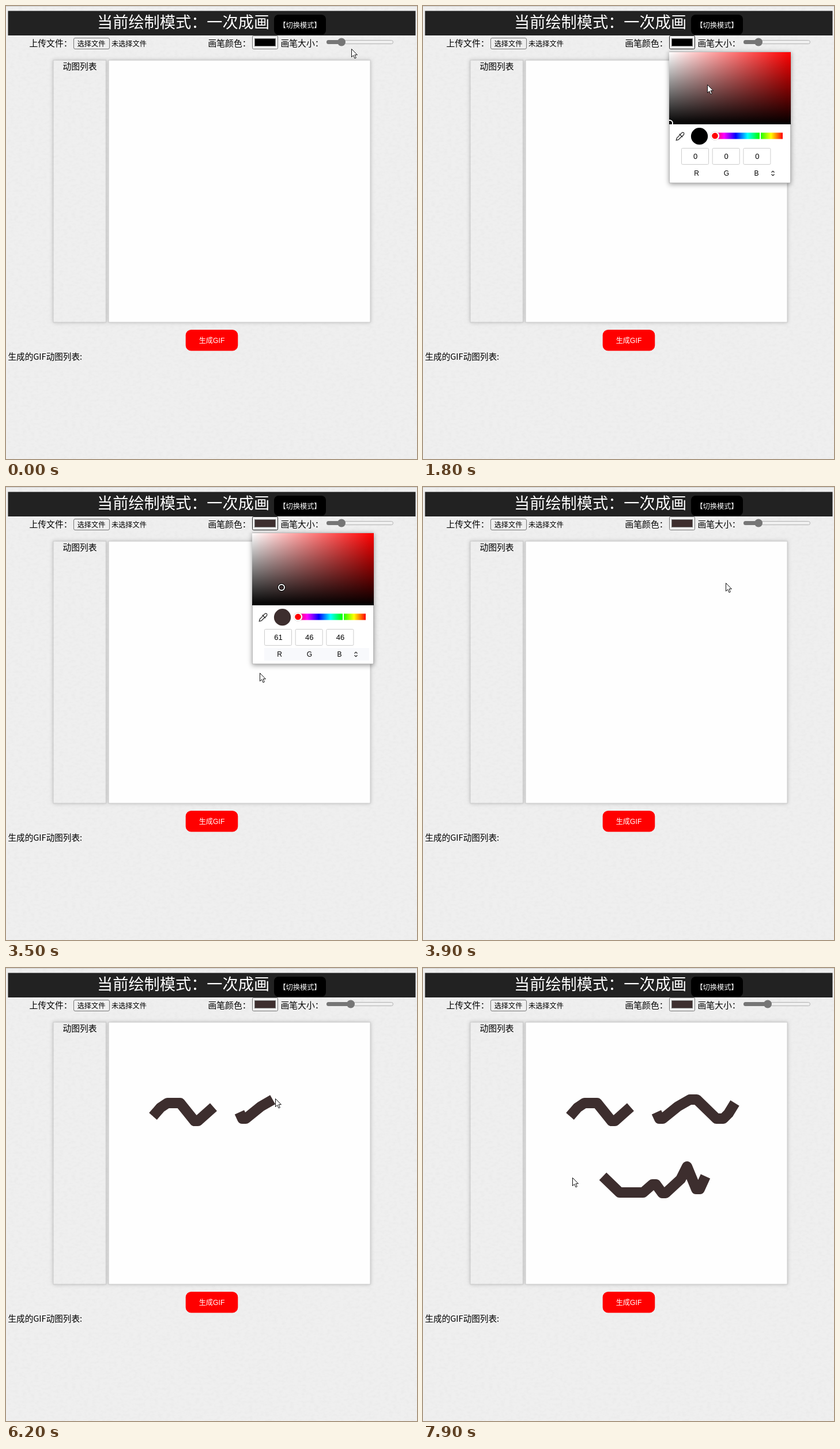
Recreate the animation shown at these times as an HTML page. Size 713 by 785 pixels, loop 8000 ms.

```html
<!DOCTYPE html>
<html lang="zh-CN">
<head>
<meta charset="utf-8">
<style>
html, body { margin: 0; width: 100%; height: 100%; overflow: hidden; background: #efefef }
svg { display: block; position: absolute; left: 0; top: 0 }
text { font: 14.8px "Noto Sans CJK SC", "Noto Sans CJK", "Noto Sans", sans-serif }
text.s { font-size: 12.2px }
text.n { font: 13px "Liberation Sans", Arial, sans-serif; text-anchor: middle }
.mid { text-anchor: middle }
.panel { filter: drop-shadow(0 0 3px #bbb); stroke: #ccc }
.popup { filter: drop-shadow(0 2px 4px #0006); fill: #fff; stroke: #bbb }
.box { fill: #fff; stroke: #ccc }
#ink { fill: none; stroke: #3d2e2e; stroke-width: 18; stroke-linejoin: round }
</style>
</head>
<body>
<svg width="713" height="785" viewBox="0 0 713 785">
  <defs>
    <filter id="paper" x="0" y="0" width="1" height="1" color-interpolation-filters="sRGB">
      <feTurbulence type="fractalNoise" baseFrequency=".14 .22" numOctaves="2" seed="4"/>
      <feColorMatrix values="0 0 0 0 0  0 0 0 0 0  0 0 0 0 0  .04 0 0 0 -.016"/>
    </filter>
    <linearGradient id="sat"><stop stop-color="#fff"/><stop offset="1" stop-color="#f00"/></linearGradient>
    <linearGradient id="val" x2="0" y2="1"><stop stop-opacity="0"/><stop offset="1"/></linearGradient>
    <linearGradient id="hue"></linearGradient>
    <clipPath id="area"><path d="M427 80H638V205H427Z"/></clipPath>
  </defs>

  <rect width="713" height="785" fill="#efefef"/>
  <rect class="panel" x="82" y="94" width="91.5" height="454" fill="#efefef"/>
  <rect x="3" width="710" height="785" filter="url(#paper)"/>
  <path d="M0 .5H713" stroke="#ccc"/>
  <rect class="panel" x="178" y="94" width="454" height="454" fill="#fefefe"/>

  <rect x="3.5" y="8.5" width="707" height="42.5" fill="#222"/>
  <text x="158" y="38.3" fill="#fff" style="font-size:27.2px">当前绘制模式：一次成画</text>
  <rect x="465" y="15" width="90" height="35" rx="8"/>
  <text class="s mid" x="510" y="37.5" fill="#fff">【切换模式】</text>

  <text x="40.5" y="70">上传文件：</text>
  <rect x="117.5" y="55.5" width="62" height="19" rx="2.5" fill="#efefef" stroke="#767676"/>
  <text class="s mid" x="148" y="69.7">选择文件</text>
  <text class="s" x="183" y="69.7">未选择文件</text>
  <text x="350.5" y="70">画笔颜色：</text>
  <rect id="well" x="427.5" y="51.5" width="44" height="23" rx="2" fill="#efefef"/>
  <rect class="tint" x="431.5" y="56.5" width="36" height="13" stroke="#777"/>
  <text x="476.5" y="70">画笔大小：</text>
  <rect x="556.5" y="59.5" width="115" height="6" rx="3" fill="#efefef" stroke="#b2b2b2"/>
  <rect id="fill" x="556" y="59" height="7" rx="3.5" fill="#767676"/>
  <circle id="knob" cy="62.5" r="7" fill="#767676"/>

  <text class="mid" x="128" y="110">动图列表</text>
  <rect x="311.7" y="561" width="90.6" height="36.5" rx="9.5" fill="#f00"/>
  <text class="s mid" x="357" y="584" fill="#fff" style="font-family:'Liberation Sans','Noto Sans CJK SC',sans-serif">生成GIF</text>
  <text x="3.5" y="613" style="font-size:14.6px">生成的GIF动图列表:</text>

  <g id="ink"></g>

  <g id="picker">
    <rect class="popup" x="427.5" y="79.5" width="210" height="227"/>
    <rect x="427" y="80" width="211" height="125" fill="url(#sat)"/>
    <rect x="427" y="80" width="211" height="125" fill="url(#val)"/>
    <g clip-path="url(#area)"><g id="ring">
      <circle class="tint" r="5" stroke="#000" stroke-width="4"/>
      <circle r="5" fill="none" stroke="#fff" stroke-width="2"/>
    </g></g>
    <path transform="translate(446 226) rotate(45)" fill="none" stroke="#222" stroke-width="1.2"
      d="M-2 -2V6L0 9.5L2 6V-2M-4 -2H4M-2.3 -2V-7Q0 -11 2.3 -7V-2"/>
    <circle class="tint" cx="479.5" cy="225.7" r="14.6"/>
    <rect x="502" y="219.5" width="122" height="11" fill="url(#hue)"/>
    <path d="M585 219V231" stroke="#fff" stroke-width="2"/>
    <circle cx="506.5" cy="225" r="7.8" fill="#ccc"/>
    <circle cx="506.5" cy="225" r="6.3" fill="#f00" stroke="#fff" stroke-width="2"/>
    <rect id="hover" x="448" y="279" width="182" height="22" fill="#f8f9fc"/>
    <g id="fields"></g>
    <path d="M604.5 288.5L607 286L609.5 288.5M604.5 291.5L607 294L609.5 291.5" fill="none" stroke="#222" stroke-width="1.2"/>
  </g>

  <path id="cursor" d="M.5 .5V14.5L3.7 11.5L6 16.8L8.3 15.8L6 10.7H10.4Z" fill="#fff" stroke="#111"/>
</svg>
<script>
const $ = id => document.getElementById(id);
const all = q => [...document.querySelectorAll(q)];
const progress = (t, a, b) => Math.min(1, Math.max(0, (t - a) / (b - a)));

$('hue').innerHTML = ['f00', 'f0f', '00f', '0ff', '0f0', 'ff0', 'f00']
  .map((c, i) => `<stop offset="${i / 6}" stop-color="#${c}"/>`).join('');
$('fields').innerHTML = ['R', 'G', 'B'].map((c, i) => `
  <rect class="box" x="${448.5 + i * 53.7}" y="246.5" width="47" height="28" rx="2"/>
  <text class="n value" x="${472.5 + i * 53.7}" y="265"></text>
  <text class="n" style="font-size:12px" x="${474.5 + i * 52}" y="294">${c}</text>`).join('');

// The hand: hop() glides to a point, stroke() draws through its points.
const steps = [];
const hop = (start, end, x, y) => steps.push({ start, end, x, y });
function stroke(start, end, d) {
  $('ink').insertAdjacentHTML('beforeend', `<path d="M${d}"/>`);
  const path = $('ink').lastChild;
  steps.push({ start, end, path, length: path.getTotalLength() });
}

hop(0, 400, 450, 66);       // open the picker
hop(500, 900, 430, 198);
hop(1000, 1800, 493, 136);
hop(1800, 2000, 478, 174);  // pick a colour
hop(2100, 2700, 547, 288);
hop(2800, 3500, 440, 322);  // close the picker
hop(3600, 4100, 581, 62);
hop(4200, 4600, 598, 62);   // drag the slider
hop(4700, 4800, 488, 123);
hop(4800, 5100, 257, 260);
stroke(5100, 5600, '255 257L268 242L280 234H302L327 265H333L360 241');
hop(5600, 5900, 409, 248);
stroke(6000, 6480, '405 250L410 261H416L442 240L463 228H475L509 261H521L530 252L541 234');
hop(6500, 6700, 317, 358);
stroke(6800, 7500, '312 361L341 389H382L398 375H404L415 390H421L447 366L458 344L474 383H480L490 361');
hop(7600, 7900, 259, 363);

function moveHand(t) {
  let x = 599, y = 74;
  for (const s of steps) {
    const k = progress(t, s.start, s.end);
    if (s.path) {
      s.path.style.display = k ? '' : 'none';
      s.path.style.strokeDasharray = k < 1 ? `${k * s.length} ${s.length * 2}` : 'none';
    }
    if (!k) continue;
    if (s.path) {
      const tip = s.path.getPointAtLength(k * s.length);
      x = tip.x + 4;
      y = tip.y - 2;
    } else {
      x += (s.x - x) * k;
      y += (s.y - y) * k;
    }
  }
  $('cursor').setAttribute('transform', `translate(${Math.round(x)} ${Math.round(y)})`);
}

function draw(t) {
  const open = t >= 400 && t < 3600, picked = t >= 2100;
  const rgb = picked ? [61, 46, 46] : [0, 0, 0];
  all('.tint').forEach(e => e.setAttribute('fill', `rgb(${rgb})`));
  all('.value').forEach((e, i) => e.textContent = rgb[i]);
  $('ring').setAttribute('transform', picked ? 'translate(478 174)' : 'translate(428 203)');
  $('picker').style.display = open ? '' : 'none';
  $('hover').style.display = t >= 2700 ? '' : 'none';
  $('well').setAttribute('stroke', open ? '#222' : '#767676');

  const size = 26 + 16 * progress(t, 4200, 4600);
  $('knob').setAttribute('cx', 556 + size);
  $('fill').setAttribute('width', size);
  moveHand(t);
}

// the screen refreshes ten times a second
function tick() {
  draw(Math.floor(performance.now() % 8000 / 100) * 100);
  requestAnimationFrame(tick);
}
tick();
</script>
</body>
</html>
```
